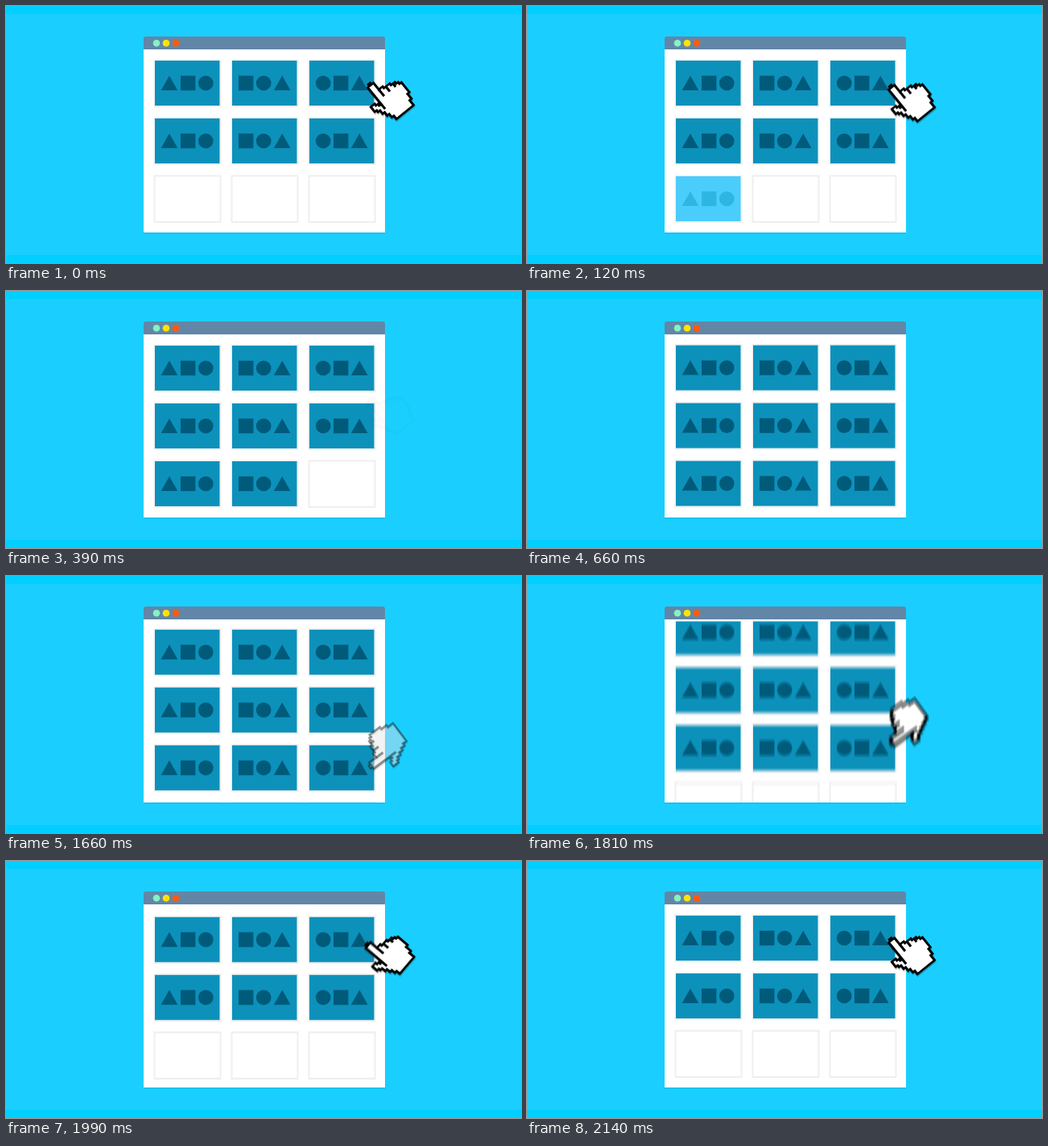
Animation, 640 px wide and 320 px high, one loop 2170 ms. Source, as an HTML page with a canvas:

```html
<!DOCTYPE html>
<html lang="en">
<head>
<meta charset="utf-8">
<title>Scrolling grid</title>
<style>
  html, body { margin: 0; width: 100%; height: 100%; overflow: hidden; background: #1acfff; }
  canvas { display: block; }
</style>
</head>
<body>
<canvas id="stage" width="640" height="320"></canvas>
<script>
const view = document.getElementById('stage').getContext('2d');
const buffer = document.createElement('canvas');
buffer.width = 640;
buffer.height = 320;
const ctx = buffer.getContext('2d');

// The motion runs in 30 ms steps and pauses for a second at PAUSE.
const LOOP = 2170, STEP = 30, PAUSE = 660, PAUSE_TIME = 1000;
const SHUTTER = 16, SAMPLES = 8;
const ROW = 72, COL = 96;
const FADE_START = [60, 240, 420], FADE_TIME = 120;
const TILE = [[255, 255, 255], [72, 207, 255], [12, 145, 187]];
const SHAPE = [[255, 255, 255], [43, 187, 232], [0, 90, 122]];
const LAYOUT = [
  [['triangle', 18], ['square', 41.2], ['circle', 63.3]],
  [['square', 17.2], ['circle', 39.2], ['triangle', 62.2]],
  [['circle', 17.2], ['square', 39.2], ['triangle', 62.2]]
];

const clamp = v => Math.min(1, Math.max(0, v));
const lerp = (a, b, k) => a + (b - a) * k;
const progress = (t, start, time) => clamp((t - start) / time);
const easeInOut = (x, power) => x < .5 ? (2 * x) ** power / 2 : 1 - (2 - 2 * x) ** power / 2;

function blend(stops, k) {
  const i = k < .5 ? 0 : 1;
  return `rgb(${stops[i].map((v, c) => lerp(v, stops[i + 1][c], k * 2 - i))})`;
}

function rect(color, x, y, w, h) {
  ctx.fillStyle = color;
  ctx.fillRect(x, y, w, h);
}

function disc(color, x, y, r) {
  ctx.fillStyle = color;
  ctx.beginPath();
  ctx.arc(x, y, r, 0, Math.PI * 2);
  ctx.fill();
}

const draw = {
  circle: (color, x, y) => disc(color, x, y, 9.3),
  square: (color, x, y) => rect(color, x - 9.2, y - 9.2, 18.4, 18.4),
  triangle(color, x, y) {
    ctx.fillStyle = color;
    ctx.beginPath();
    ctx.moveTo(x, y - 9.3);
    ctx.lineTo(x + 10.3, y + 9);
    ctx.lineTo(x - 10.3, y + 9);
    ctx.fill();
  }
};

function cell(col, y, k) {
  const x = 185 + col * COL;
  ctx.strokeStyle = '#efefef';
  ctx.lineWidth = 2;
  ctx.strokeRect(x - .5, y - .5, 82, 57.5);
  if (k <= 0) return;
  rect(blend(TILE, k), x, y, 80.5, 56);
  for (const [kind, dx] of LAYOUT[col]) draw[kind](blend(SHAPE, k), x + dx, y + 28);
}

function browserWindow(t) {
  const scroll = ROW * easeInOut(progress(t, 564, 600), 4);
  rect('rgba(0,60,90,.08)', 171, 282, 300, 2);
  rect('#fff', 171, 50, 300, 232);
  ctx.save();
  ctx.beginPath();
  ctx.rect(171, 56.5, 300, 225.5);
  ctx.clip();
  for (let row = 0; row < 4; row++) {
    for (let col = 0; col < 3; col++) {
      const k = row < 2 ? 1 : row > 2 ? 0 : progress(t, FADE_START[col], FADE_TIME);
      cell(col, 68 + ROW * row - scroll, k);
    }
  }
  ctx.restore();
  ctx.fillStyle = '#6286a7';
  ctx.beginPath();
  ctx.roundRect(171, 38, 300, 16, [3, 3, 0, 0]);
  ctx.fill();
  ['#85f2c5', '#ffe400', '#ff5a0e'].forEach((color, i) => disc(color, 187 + 12 * i, 46.2, 4.3));
}

const outline = new Path2D('M4 14V1H5V0H6V1H7V5H9V6H12V7H14V8H15V9H16V15H15V18H14V21H5' +
  'V19H4V17H3V15H2V13H1V12H0V9H2V10H3V11H4Z');
const folds = new Path2D('M7 5V9M10 6V9M13 7V9');

function handLayer(x, y, angle, fill) {
  ctx.save();
  ctx.translate(x, y);
  ctx.rotate((angle - 39) * Math.PI / 180);
  ctx.scale(3.05, 2.65);
  ctx.translate(-9, -10.5);
  ctx.lineWidth = 1;
  ctx.fillStyle = fill;
  ctx.strokeStyle = '#000';
  ctx.fill(outline);
  ctx.stroke(outline);
  ctx.stroke(folds);
  ctx.restore();
}

function hand(t) {
  let x = 477.2, y = 111.5, angle = 0, alpha;
  if (t < PAUSE) {
    y += 37 * easeInOut(progress(t, 0, 390), 4);
    alpha = 1 - progress(t, 180, 210);
  } else {
    const turn = easeInOut(progress(t, 760, 400), 4);
    x = lerp(468, x, turn);
    y = lerp(213, y, easeInOut(progress(t, 570, 600), 5));
    angle = lerp(-88, 0, turn);
    alpha = progress(t, PAUSE, 75);
  }
  if (alpha <= 0) return;
  ctx.globalAlpha = alpha * .2;
  handLayer(x + .5, y + 2, angle, '#000');
  ctx.globalAlpha = alpha;
  handLayer(x, y, angle, '#fff');
  ctx.globalAlpha = 1;
}

function scene(t) {
  rect('#00cfff', 0, 0, 640, 320);
  rect('#1acfff', 0, 10, 640, 300);
  browserWindow(t);
  hand(t);
}

function motionTime(ms) {
  if (ms >= PAUSE) ms = Math.max(PAUSE, ms - PAUSE_TIME + STEP);
  return Math.floor(ms / STEP) * STEP;
}

function frame() {
  const t = motionTime(performance.now() % LOOP);
  // Average several moments for motion blur; the paused picture stays sharp.
  const shutter = t === PAUSE ? 0 : SHUTTER;
  for (let i = 0; i < SAMPLES; i++) {
    scene(Math.max(0, t + shutter * ((i + .5) / SAMPLES - .5)));
    view.globalAlpha = 1 / (i + 1);
    view.drawImage(buffer, 0, 0);
  }
  requestAnimationFrame(frame);
}
frame();
</script>
</body>
</html>
```
